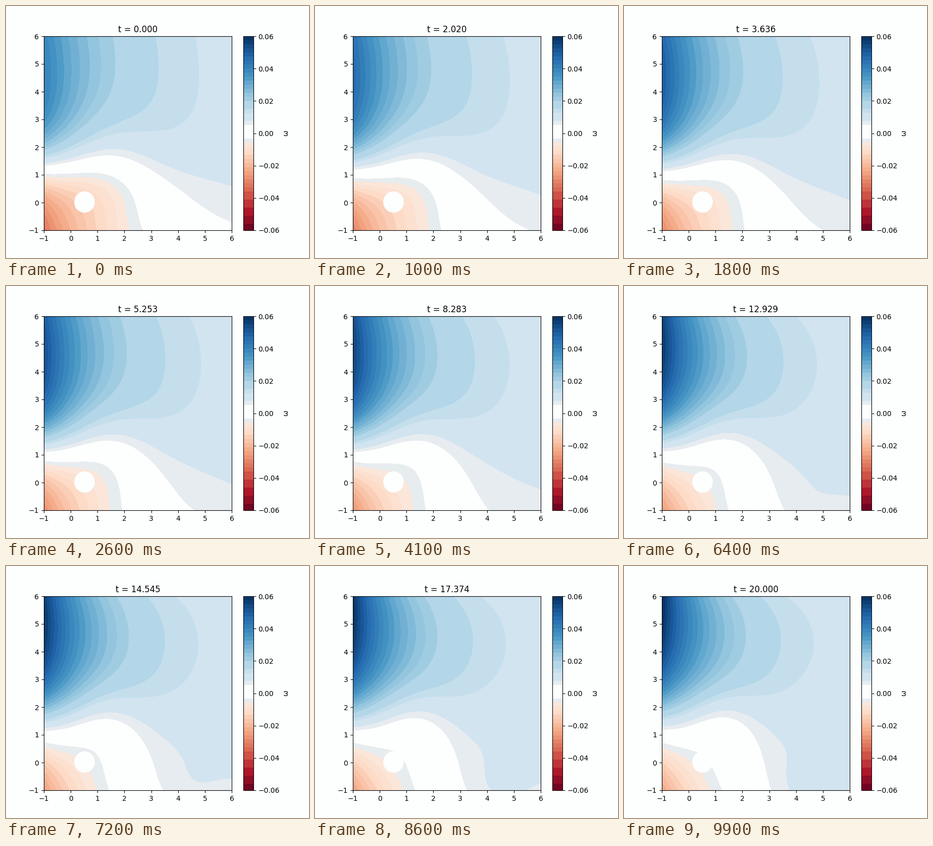
Write a matplotlib script that moves like this. It is 600 by 500 pixels and loops after 10000 ms.

```python
import numpy as np
import matplotlib.pyplot as plt
from matplotlib.animation import FuncAnimation
from matplotlib.colors import BoundaryNorm, ListedColormap
from matplotlib.patches import Circle

FRAMES, T_END = 100, 20.0
PAPER = "#fdfefe"

axis = np.linspace(-1, 6, 100)
X, Y = np.meshgrid(axis, axis)


def settle(start, end, t, tau):
    """Exponential approach from start to end."""
    return end + (start - end) * np.exp(-t / tau)


def blob(cx, cy, sx, sy):
    return np.exp(-((X - cx) / sx) ** 2 / 2 - ((Y - cy) / sy) ** 2 / 2)


def inflow(t):
    """Profile on the left edge: a red lobe below, a blue lobe above."""
    red, blue = 40, settle(33, 56, t, 6)
    mid = settle(1.4, 1.05, t, 3) + 0.015 * t
    rise = Y - mid
    size = red + (blue - red) * (1 + np.tanh(rise / 0.8)) / 2
    droop = (3.5 + 0.035 * t * (19 - t)) * np.exp((Y - 6) / 1.3)
    return size * np.tanh(rise / (1.3 + 0.045 * t)) - droop


def vorticity(t):
    reach = settle(2.5, 2.15, t, 4) - t / 40 * (Y / 6) ** 6
    floor = settle(2.9, 1.4, t, 3) * np.exp(-(Y + 1) / (1 + 0.03 * t))
    wake = (8.3 - 0.08 * t) * blob(1.1, 1.1 + 0.015 * t,
                                   1.3 - 0.015 * t, 1.4 - 0.02 * t)
    swell = 3.2 * (t / T_END) ** 2 * blob(4.2, -1, 1, 0.9)
    field = 9.4 - floor + inflow(t) * np.exp(-(X + 1) / reach) - wake + swell
    return np.clip(field / 1000, -0.0599, 0.0599)


def build_scale():
    reds = -0.0034 - 0.0025 * np.arange(14)
    deep = reds[-1] - 0.005 * np.arange(1, 5)
    pale = [0.005, 0.0075, 0.0125, 0.015]
    blues = np.linspace(0.02, 0.06, 17)
    levels = np.concatenate([[-0.06], deep[::-1], reds[::-1], pale, blues])
    mids = (levels[1:] + levels[:-1]) / 2
    colors = list(plt.get_cmap("RdBu")((mids + 0.06) / 0.12))
    white = int(np.argmin(np.abs(mids - 0.0008)))
    colors[white - 1:white + 4] = ["#e7ecef", PAPER, "#e7ecf0",
                                   "#d2e4f0", "#c4deec"]
    return levels, ListedColormap(colors)


levels, cmap = build_scale()
norm = BoundaryNorm(levels, cmap.N)

fig, ax = plt.subplots(figsize=(6, 5), dpi=100, facecolor=PAPER)


def draw_field(t):
    return ax.contourf(X, Y, vorticity(t), levels=levels, cmap=cmap, norm=norm)


state = {"fill": draw_field(0)}
ax.add_patch(Circle((0.515, 0.02), 0.385, color=PAPER, lw=0, zorder=2))
bar = fig.colorbar(state["fill"], ax=ax, spacing="proportional",
                   ticks=np.linspace(-0.06, 0.06, 7), label="ω")
bar.minorticks_off()
title = ax.set_title("t = 0.000")


def update(i):
    t = T_END * i / (FRAMES - 1)
    state["fill"].remove()
    state["fill"] = draw_field(t)
    title.set_text(f"t = {t:.3f}")
    return state["fill"], title


anim = FuncAnimation(fig, update, frames=FRAMES, interval=100,
                     repeat=True, repeat_delay=0, blit=False)
plt.show()
```
